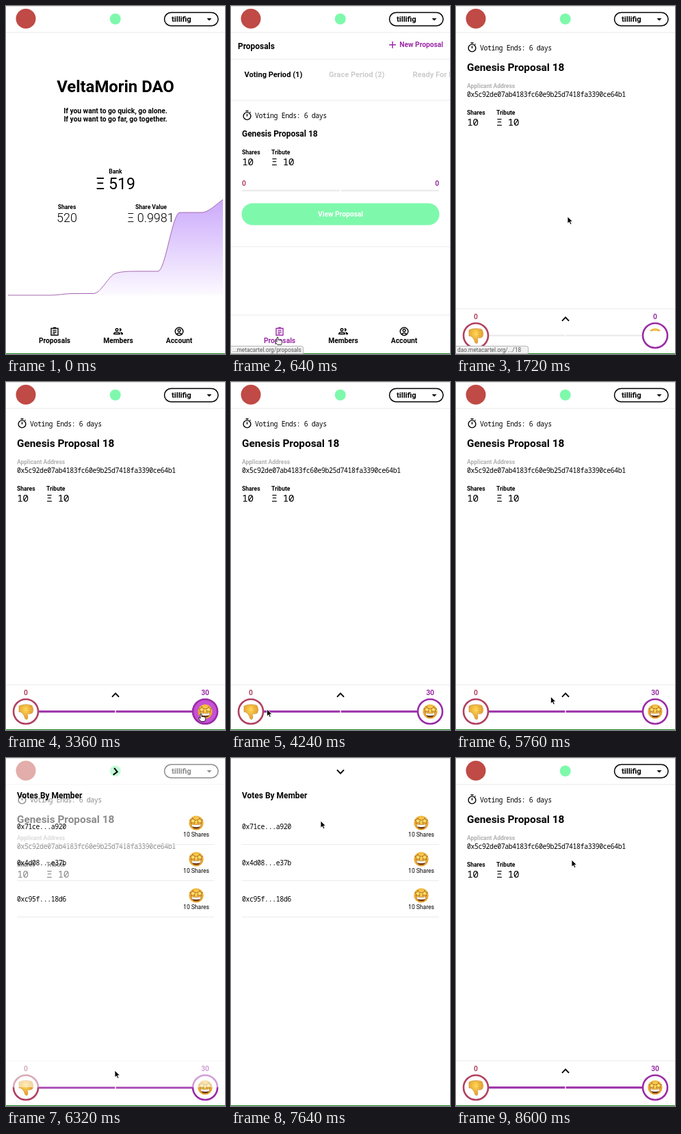
An HTML page that plays this animation: 320 by 509 pixels, repeating every 8640 ms.

```html
<!DOCTYPE html>
<html lang="en">
<head>
<meta charset="utf-8">
<title>DAO voting demo</title>
<style>
  html, body { margin: 0; width: 100%; height: 100%; overflow: hidden; background: #fff; }
  svg { display: block; width: 320px; height: 509px; }
  text { font-family: Roboto, Arial, sans-serif; font-weight: 700; white-space: pre; }
  .mono { font-family: "Noto Sans Mono", "DejaVu Sans Mono", monospace; font-weight: 400; letter-spacing: -.04em; }
  .light { font-weight: 300; }
  .reg { font-weight: 400; }
  .mid { text-anchor: middle; }
  .end { text-anchor: end; }
  .rule { stroke: #ebebeb; }
  .line { fill: none; stroke: currentColor; stroke-width: 1.4; }
</style>
</head>
<body>
<svg id="stage" viewBox="0 0 320 509" xmlns="http://www.w3.org/2000/svg"></svg>
<script>
const LOOP = 8640;
const PURPLE = '#9a2ba6', RED = '#b0415f', GREEN = '#7ef9ac';

const text = (x, y, size, str, cls = '', fill = '#000') =>
  `<text x="${x}" y="${y}" font-size="${size}" class="${cls}" fill="${fill}">${str}</text>`;
const rule = (y, x1 = 0, x2 = 320) =>
  `<path class="rule" d="M${x1} ${y}H${x2}"/>`;
const group = (id, body, attrs = '') => `<g id="${id}" ${attrs}>${body}</g>`;

const timer = y => `<g class="line" transform="translate(23.5 ${y})">
  <circle cy="1" r="5.4"/><path d="M0 1.5V-2M-2-6.5H2M4-4L5-5"/></g>`;

function star(cx, cy, r) {
  let d = '';
  for (let i = 0; i < 10; i++) {
    const a = i * Math.PI / 5 - Math.PI / 2, k = i % 2 ? r * 0.5 : r;
    d += `${i ? 'L' : 'M'}${(cx + k * Math.cos(a)).toFixed(2)} ${(cy + k * Math.sin(a)).toFixed(2)}`;
  }
  return `<path d="${d}Z" fill="#ffe06a" stroke="#a8641c" stroke-width=".9"/>`;
}

const starFace = (x, y) => `<g transform="translate(${x} ${y})">
  <circle r="10.6" fill="url(#face)"/>
  <path d="M-7 1.8Q0 3.6 7 1.8Q6.4 8.6 0 8.6T-7 1.8Z" fill="#6b3a18"/>
  <path d="M-6.6 2.1Q0 3.8 6.6 2.1L6 5.2Q0 6.6 -6 5.2Z" fill="#fff"/>
  ${star(-4.9, -2.8, 4.6)}${star(4.9, -2.8, 4.6)}</g>`;

const thumbDown = (x, y) => `<g transform="translate(${x} ${y})" stroke="#c98a2c" stroke-width=".6" stroke-linejoin="round">
  <path d="M-10-8Q-5-10.5 1-10.3L7-9.6Q10-9 9.5-6.5Q11.5-5 10.3-3Q11.5-1 9.8 .6Q10 3 7 3.2L2 3.4Q3.5 7 2.6 10.5Q1 12.5-1 10.5Q-2 6-5 2.5Q-7 .5-10 .5Z" fill="url(#face)"/>
  <path d="M3-6.4H9.3M3-3H10M3 .4H9.5" fill="none"/></g>`;

const navIcons = [
  [71, 'Proposals', '<path d="M-5-4.5H5V5.5H-5ZM-2-5.6H2M-2.7-1.6H2.7M-2.7 1H2.7M-2.7 3.4H1"/>'],
  [164, 'Members', `<circle cx="-2" cy="-2.4" r="1.8"/><path d="M-6.3 3.8V3Q-5.6 1.3-2 1.3T2.3 3V3.8Z"/>
    <g fill="currentColor" stroke="none"><path d="M1.6-4.6Q4.8-5 4.8-2.4T1.6-.2Q2.8-2.4 1.6-4.6Z"/>
    <path d="M4 4.5V3Q3.8 1.6 2.8 .7Q6.6 1 7 3V4.5Z"/></g>`],
  [253, 'Account', '<circle r="5.8"/><circle cy="-1.6" r="1.9"/><path d="M-4 4Q0 .6 4 4"/>']
];
const nav = active => navIcons.map(([x, label, icon], i) => {
  const color = i === active ? PURPLE : '#000';
  return `<g class="line" style="color:${color}" transform="translate(${x} 476)">${icon}</g>` +
    text(x, 493.2, 10.24, label, 'mid', color);
}).join('');

const stats = y => text(16, y, 8.53, 'Shares') + text(59, y, 8.53, 'Tribute') +
  text(16, y + 15.5, 14.8, '10', 'mono') + text(59, y + 15.5, 14.8, 'Ξ 10', 'mono');

const header = `
  <circle cx="29" cy="18.5" r="14.5" fill="#c04a45"/>
  <circle cx="159.7" cy="19" r="8" fill="${GREEN}"/>
  <rect x="231.5" y="9.5" width="78.5" height="19.5" rx="9.75" fill="#fff" stroke="#000" stroke-width="1.5"/>
  ${text(242, 23, 11.1, 'tillifig')}
  <path d="M293.5 18H300.5L297 21.6Z"/>${rule(38.5)}`;

const curve = `M3 423H66C76 423 87 420.5 97 420.5H128C139 420.5 150 394 160 391
  C170 388 181 388 191 388H222C233 388 243 302 254 302H286C296 302 307 290 317 283`;
const home = `
  <path d="${curve}V423Z" fill="url(#area)"/><path d="${curve}" fill="none" stroke="#a467b0"/>
  ${text(160, 125.9, 23.9, 'VeltaMorin DAO', 'mid')}
  ${text(160, 156.9, 10.24, 'If you want to go quick, go alone.', 'mid')}
  ${text(160, 169, 10.24, 'If you want to go far, go together.', 'mid')}
  ${text(160, 245, 8.53, 'Bank', 'mid')}${text(160, 267.8, 23, 'Ξ 519', 'mid reg')}
  ${text(89, 297.3, 8.53, 'Shares', 'mid')}${text(89, 315.8, 17.9, '520', 'mid light')}
  ${text(212, 297.3, 8.53, 'Share Value', 'mid')}${text(211.5, 315.8, 17.9, 'Ξ 0.9981', 'mid light')}
  ${nav(-1)}`;

const list = `
  ${text(10, 62.6, 11.95, 'Proposals')}
  <path d="M231 56.8H241M236 51.8V61.8" stroke="${PURPLE}" stroke-width="1.5"/>
  ${text(310, 60.2, 10.24, 'New Proposal', 'end', PURPLE)}${rule(78)}
  ${text(19.5, 103.8, 11.1, 'Voting Period (1)')}
  ${text(143, 103.8, 11.1, 'Grace Period (2)', '', '#ccc')}
  ${text(265.5, 103.8, 11.1, 'Ready For Processing', '', '#ccc')}${rule(138)}
  ${timer(160)}${text(35, 164, 9.87, 'Voting Ends: 6 days', 'mono')}
  ${text(16, 190.6, 11.95, 'Genesis Proposal 18')}${stats(217.3)}
  ${text(16, 262.8, 10.24, '0', '', RED)}${text(304, 262.8, 10.24, '0', 'end', PURPLE)}
  <path d="M16 270H159M161 270H304" stroke="#ececec" stroke-width="2.6"/>
  <rect x="15.5" y="288.5" width="289" height="32" rx="16" fill="${GREEN}"/>
  ${text(160, 307.7, 10.24, 'View Proposal', 'mid', '#fff')}
  ${rule(352)}${rule(452)}${nav(0)}`;

const detail = `
  ${timer(60.5)}${text(35, 64.5, 9.87, 'Voting Ends: 6 days', 'mono')}
  ${text(16, 94.8, 15.36, 'Genesis Proposal 18')}
  ${text(16, 119.8, 8.53, 'Applicant Address', '', '#b0b0b0')}
  ${text(16, 133.3, 9.87, '0x5c92de07ab4183fc60e9b25d7418fa3390ce64b1', 'mono')}
  ${stats(159.4)}${rule(443)}
  <path d="M47 482H273" stroke="#ececec" stroke-width="2.6"/>
  <path id="votes" stroke="${PURPLE}" stroke-width="3"/>
  <path d="M160 480V484" stroke="#fff" stroke-width="1.4"/>
  ${text(29, 458.3, 10.24, '0', 'mid', RED)}
  <text id="count" x="291" y="458.3" font-size="10.24" class="mid" fill="${PURPLE}"></text>
  <circle cx="29" cy="482" r="18" fill="#fff" stroke="${RED}" stroke-width="2.6"/>
  ${thumbDown(29, 482)}
  <circle cx="291" cy="482" r="18" fill="#fff"/>
  <circle id="yesFill" cx="291" cy="482" r="18" fill="#c552d3"/>
  <circle cx="291" cy="482" r="18" fill="none" stroke="${PURPLE}" stroke-width="2.6"/>
  <g clip-path="url(#reveal)">${starFace(291, 482)}</g>`;

const voters = ['0x71ce...a920', '0x4d08...e37b', '0xc95f...18d6'];
const members = text(16, 58.8, 11.95, 'Votes By Member') + voters.map((name, i) => {
  const y = i * 53;
  return text(16, 103.5 + y, 9.87, name, 'mono') + starFace(278, 95 + y) +
    text(278, 115.1 + y, 8.53, '10 Shares', 'mid reg') + rule(126.5 + y, 16, 304);
}).join('');

const stage = document.getElementById('stage');
stage.innerHTML = `
  <defs>
    <linearGradient id="area" gradientUnits="userSpaceOnUse" x1="0" y1="283" x2="0" y2="425">
      <stop stop-color="#cba9fb"/><stop offset="1" stop-color="#fdfbff"/></linearGradient>
    <radialGradient id="face" cy=".35"><stop stop-color="#ffd95a"/><stop offset="1" stop-color="#e9a632"/></radialGradient>
    <clipPath id="reveal"><rect id="revealBox" x="270" y="470" width="42" height="24"/></clipPath>
  </defs>
  <rect width="320" height="509" fill="#fff"/>
  ${header}${group('home', home)}${group('list', list)}${group('detail', detail)}
  <rect id="veil" width="320" fill="#fff"/>
  ${group('members', members)}
  <path id="chevron" d="M-5 2.6L0-2.6L5 2.6" fill="none" stroke="#000" stroke-width="2"/>
  <path d="M0 .5H320" stroke="#e2e2e2"/><path d="M0 508.5H320" stroke="#16801a"/>
  ${group('status', `<path d="M-1 497.5H103Q105.5 497.5 105.5 500V508.5H-1Z" fill="#f1f1f1" stroke="#b0b0b0" stroke-width=".9"/>
    <text id="link" x="2" y="506" font-size="8.3" class="reg" fill="#555"></text>`)}
  ${group('cursor', `
    <path id="arrow" d="M0 0V10.2L2.4 8L4 11.6L5.8 10.8L4.2 7.3H7.4Z" stroke="#fff"/>
    <path id="hand" d="M0 1Q1-.6 2 1V4.6Q3 3.6 4 4.8Q5 4 6 5.2Q7.4 4.8 7.5 6.4V8.5L6.4 11.5H1L-2.6 7.2Q-2.6 5.4-1 6.2L0 7.2Z" fill="#fff" stroke="#000"/>`,
    'stroke-width=".8" stroke-linejoin="round"')}`;

const ui = {};
for (const el of stage.querySelectorAll('[id]')) ui[el.id] = el;

// Pointer stops: time, x, y
const path = [
  [200, 110, 505], [360, 67, 484], [760, 67, 484], [1120, 163, 308], [1960, 163, 308],
  [2560, 284, 485], [3600, 284, 485], [4400, 26, 478], [5280, 26, 478], [5920, 159, 457],
  [7060, 159, 457], [7360, 278, 205], [7640, 131, 92], [7900, 157, 17], [8080, 157, 17], [8520, 169, 149]
];
const handTimes = [[340, 840], [1080, 1600], [2520, 3680]];

const clamp = v => Math.min(1, Math.max(0, v));
const ramp = (t, start, length) => clamp((t - start) / length);
const smooth = p => p * p * (3 - 2 * p);
const within = (t, a, b) => t >= a && t < b;
const show = (el, on) => el.setAttribute('display', on ? 'inline' : 'none');

function pointer(t) {
  const i = path.findIndex(p => p[0] > t);
  if (i < 0) return path[path.length - 1].slice(1);
  const a = path[Math.max(0, i - 1)], b = path[i];
  const p = smooth(ramp(t, a[0], b[0] - a[0] || 1));
  return [a[1] + (b[1] - a[1]) * p, a[2] + (b[2] - a[2]) * p];
}

function draw(t) {
  const inDetail = t >= 1600;
  show(ui.home, t < 520);
  show(ui.list, within(t, 520, 1600));
  show(ui.detail, inDetail);

  const fill = smooth(ramp(t, 2800, 400));
  ui.votes.setAttribute('d', fill ? `M273 482H${273 - 226 * fill}` : '');
  ui.count.textContent = t < 2800 ? '0' : '30';
  ui.yesFill.setAttribute('opacity', ramp(t, 2520, 160) - ramp(t, 3620, 160));
  ui.revealBox.setAttribute('height', 5 + 19 * ramp(t, 1720, 120));

  const open = ramp(t, 6190, 240) - ramp(t, 7960, 240);
  ui.veil.setAttribute('opacity', open);
  ui.veil.setAttribute('height', 509 * (1 - (1 - open) ** 3.7));
  ui.members.setAttribute('opacity', clamp(open * 2));
  show(ui.chevron, inDetail);
  ui.chevron.setAttribute('transform', `translate(160 ${open ? 20 : 458}) rotate(${180 * open})`);

  show(ui.status, within(t, 360, 900) || within(t, 1160, 1960));
  ui.link.textContent = t < 1000 ? '...metacartel.org/proposals' : 'dao.metacartel.org/.../18';
  ui.status.setAttribute('opacity', 1 - ramp(t, 1840, 120));

  const [x, y] = pointer(t);
  const hand = handTimes.some(([a, b]) => within(t, a, b));
  show(ui.cursor, t >= 200);
  show(ui.hand, hand);
  show(ui.arrow, !hand);
  ui.cursor.setAttribute('transform', `translate(${x} ${y})`);
}

const start = performance.now();
function tick() {
  draw((performance.now() - start) % LOOP);
  requestAnimationFrame(tick);
}
tick();
</script>
</body>
</html>
```
